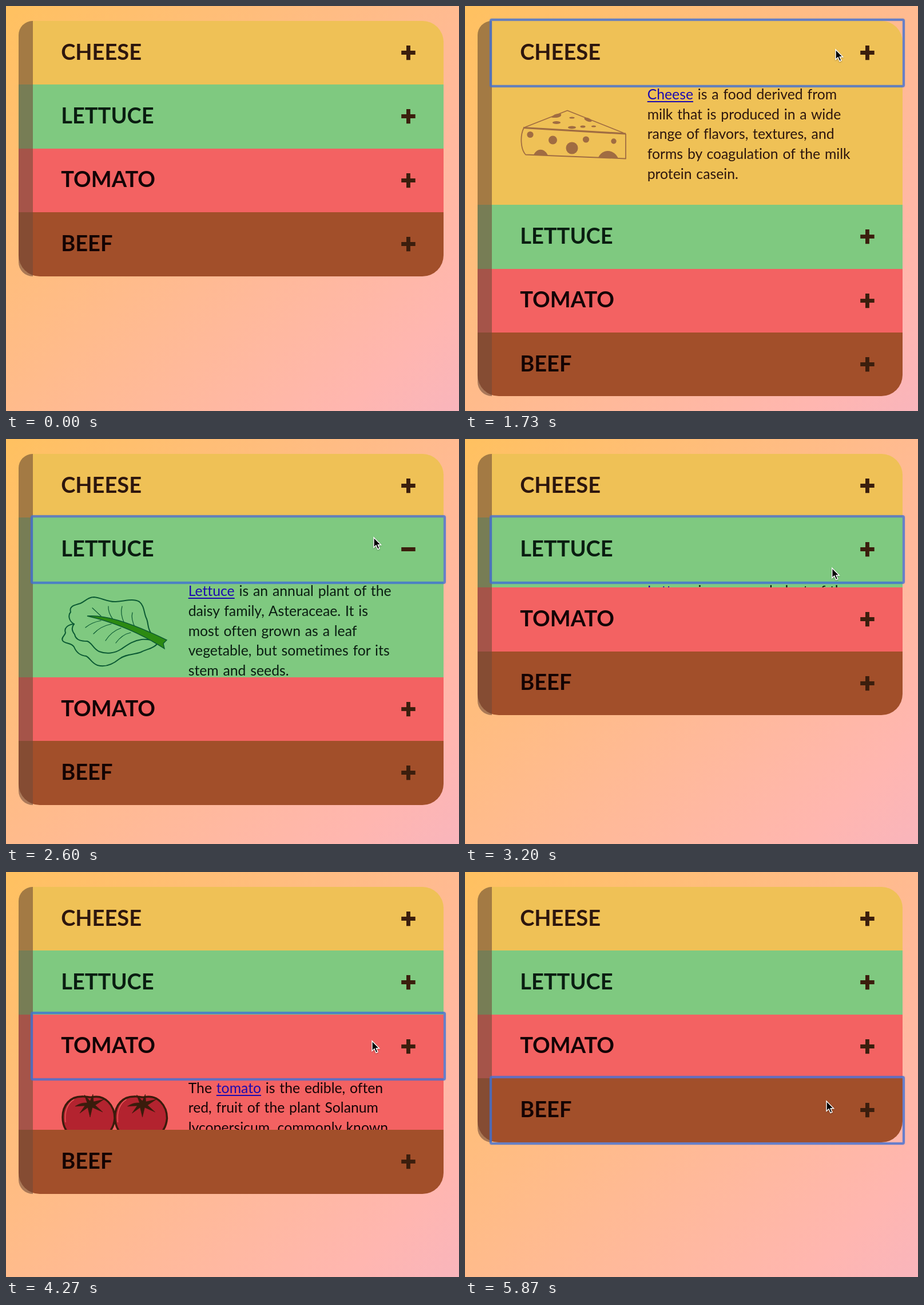
An HTML page for the animation above (5940 ms loop, 792 by 707 pixels).

```html
<!DOCTYPE html>
<html lang="en">
<head>
<meta charset="utf-8">
<title>Burger accordion</title>
<style>
  html, body { margin: 0; width: 100%; height: 100%; overflow: hidden; }
  body {
    position: relative;
    background: linear-gradient(135deg, #ffc160, #ffb6b0 87%, #f9b5bc);
    font-family: Lato, "Open Sans", sans-serif;
    font-variant-ligatures: none;
  }
  #card, #strip, #ring, #cursor, h2, p, .icon, .panel svg { position: absolute; margin: 0; }
  #card {
    left: 22.3px; top: 26px; width: 742.5px; overflow: hidden;
    border-radius: 24.75px 37px 37px 37px;
  }
  #strip {
    left: 22.3px; top: 26px; width: 24.75px;
    border-radius: 24.75px 0 0 24.75px;
    background: rgba(114, 75, 58, .6);
  }
  #ring {
    left: 43px; width: 718px; height: 112px;
    border: 4px solid rgba(66, 113, 212, .8); border-radius: 4px;
    box-shadow: 0 0 1.5px rgba(66, 113, 212, .6), inset 0 0 1.5px rgba(66, 113, 212, .6);
  }
  section { position: relative; }
  header { position: relative; height: 111.375px; }
  h2 {
    left: 73.9px; top: -2.4px;
    font-size: 38px; font-weight: 700; line-height: 111.375px;
  }
  .icon { left: 668.3px; top: 43px; width: 25px; height: 26px; fill: #3b1e0d; }
  .panel { position: relative; overflow: hidden; }
  .panel svg { left: -22.3px; overflow: visible; }
  p {
    left: 296.4px; top: -.5px; white-space: nowrap;
    font-size: 24.75px; line-height: 34.65px; word-spacing: 1.5px;
  }
  u { color: #1c0ab0; text-decoration-thickness: 1.6px; text-underline-offset: 2.5px; }
  #cursor { left: 0; top: 0; overflow: visible; filter: drop-shadow(0 1px 1px rgba(0, 0, 0, .3)); }
</style>
</head>
<body>
<div id="card"></div>
<div id="strip"></div>
<div id="ring"></div>
<svg id="cursor" width="14" height="22">
  <path d="M0 0V17.5L4 13.8 7 20.5 10 19.2 7.2 12.8H12.6Z" stroke="#fff" stroke-width="1.4"/>
</svg>
<script>
const STEP = 200 / 3, LOOP = 5940, HEAD = 111.375, TOP = 26, LINE = 34.65, FADE = 300;
const $ = id => document.getElementById(id);
const ellipse = (x, y, rx, ry = rx, turn = 0) =>
  `<ellipse cx="${x}" cy="${y}" rx="${rx}" ry="${ry}" transform="rotate(${turn} ${x} ${y})"/>`;

const cheeseArt = `
  <g fill="none" stroke="#a06c42" stroke-width="1.8" stroke-linejoin="round">
    <path d="M105 211.500L179 182.500 277 221.500"/>
    <path d="M103 212.500C96 226 97 250 106 259.500L281 266.500V223"/>
    <path d="M102 212.500L281 223" stroke-width="3.2"/>
  </g>
  <g fill="#a06c42">
    ${ellipse(114, 224.5, 5.6)}${ellipse(153.5, 234, 7.5)}${ellipse(187, 248, 10.5)}
    ${ellipse(211.5, 233, 5.6)}${ellipse(260, 236, 4.7)}
    ${ellipse(187, 195, 4.5, 1.5)}${ellipse(160, 203.5, 7, 2.5)}${ellipse(187, 212, 7, 2.6)}
    ${ellipse(206, 210.5, 4.5, 2)}${ellipse(225, 210, 4, 1.6)}${ellipse(215, 198.5, 7, 3, 22)}
    <path d="M151 194.500C155 189 161 187 168 188.500 170 195 158 196 151 194.500Z"/>
    <path d="M120 260C125 248 139 247 145 261Z"/>
    <path d="M233 264.500C240 249 260 249 268 266Z"/>
  </g>`;

const lettuceArt = `
  <g fill="none" stroke="#0b5a33" stroke-width="2" stroke-linecap="round">
    <path d="M119 323C110 318 108 308 113 302 110 291 121 290 130 287 139 283 143 276 154 276
      C167 277 178 285 192 284 208 283 222 278 233 284 242 291 241 303 245 312 250 322 246 330 255 341"/>
    <path d="M119 323C108 324 101 330 104 338 103 344 96 346 99 352 103 358 114 355 119 363
      C123 373 130 378 140 379 147 382 149 391 160 395 174 399 187 393 198 384 210 375 223 377 236 372
      C248 366 257 366 264 358L274 357"/>
    <path d="M119 323C113 330 116 336 120 341 122 352 133 353 142 353 151 356 152 366 163 371
      C176 376 190 374 201 367 213 359 222 352 237 350 250 349 260 353 271 352"/>
    <path d="M166 309L151 295M187 315Q178 302 179 292M207 322Q199 305 203 292M226 330Q218 314 221 303
      M166 317Q150 320 139 329M184 323Q165 327 153 340M201 330Q184 336 174 352M218 338Q203 341 192 356"
      stroke-width="1.2"/>
  </g>
  <path d="M142 309C176 306 226 324 281 351L275 357 277 366C240 342 198 322 142 309Z"
    fill="#2c8a12" stroke="#0b5a33" stroke-width="1.4"/>`;

const tomato = x => `
  <g transform="translate(${x})" stroke="#3a1c0c" stroke-linejoin="round">
    <path d="M99 428C99 406 113 392 132 392 139 391 144 394 150 393 174 388 190 408 190 430
      C188 456 167 470 145 470 121 470 99 456 99 428Z" fill="#b3232f" stroke-width="3.4"/>
    <path d="M104 437C102 417 108 404 119 397" fill="none" stroke="#f36262" stroke-width="1.2"/>
    <path d="M121 409Q131 402 142 403L137 389 147 400 152 388 153 401 171 397 156 407 169 419
      151 411 147 428 143 411 129 421 138 408Z" fill="#3a1c0c" stroke-width=".6"/>
  </g>`;

const beefArt = `
  <g stroke="#35150b" stroke-width="1.8">
    <path d="M98 553C98 532 130 509 170 510 213 510 211 538 241 544 261 547 283 546 281 560
      C278 583 264 592 235 598 192 605 150 608 125 603 101 594 97 570 98 553Z" fill="#70221a"/>
    <path d="M108 551C109 535 132 519 160 519 199 517 210 536 230 548 249 553 266 551 265 560
      C261 572 225 574 180 574 140 573 108 566 108 551Z" fill="#9d1227"/>
    <path d="M98 556C105 580 150 584 200 584 251 583 275 574 281 560" fill="none"/>
    <g fill="#fff">${ellipse(155.5, 539, 14, 6, 6)}</g>
  </g>`;

// open and close are click times in ms
const items = [
  { name: "CHEESE", color: "#efc156", ink: "#2d160e", open: 1200, close: 1733, art: cheeseArt, lines: [
    "<u>Cheese</u> is a food derived from", "milk that is produced in a wide",
    "range of flavors, textures, and", "forms by coagulation of the milk", "protein casein."] },
  { name: "LETTUCE", color: "#7fc980", ink: "#0a1d11", open: 2416, close: 2950, art: lettuceArt, lines: [
    "<u>Lettuce</u> is an annual plant of the", "daisy family, Asteraceae. It is",
    "most often grown as a leaf", "vegetable, but sometimes for its", "stem and seeds."] },
  { name: "TOMATO", color: "#f36262", ink: "#140406", open: 3640, close: 4168, art: tomato(0) + tomato(91.5), lines: [
    "The <u>tomato</u> is the edible, often", "red, fruit of the plant Solanum",
    "lycopersicum, commonly known", "as a tomato plant."] },
  { name: "BEEF", color: "#a24f2a", ink: "#140303", open: 4780, close: 5330, art: beefArt, lines: [
    "<u>Beef</u> is the culinary name for", "meat from cattle, particularly",
    "skeletal muscle. Beef is a source", "of high-quality protein and", "essential nutrients."] }
];

// time, x, y of the pointer
const path = [
  [460, 800, 330], [1100, 648, 76], [1750, 648, 76], [2350, 643, 172], [2950, 643, 172],
  [3500, 640, 295], [4270, 640, 295], [4720, 632, 400], [LOOP, 632, 400]
];

items.forEach((item, i) => {
  const section = document.createElement("section");
  section.style.cssText = `background:${item.color};color:${item.ink}`;
  section.innerHTML = `
    <header><h2>${item.name}</h2>
      <svg class="icon"><path d="M.2 9.100H24.700V15.900H.2Z"/><path class="bar" d="M9 0H15.900V25.200H9Z"/></svg>
    </header>
    <div class="panel">
      <svg width="792" height="707" style="top:${-TOP - HEAD * (i + 1)}px">${item.art}</svg>
      <p>${item.lines.join("<br>")}</p>
    </div>`;
  $("card").append(section);
  item.panel = section.querySelector(".panel");
  item.bar = section.querySelector(".bar");
  item.full = item.lines.length * LINE + 37.1;
});

const clamp = v => Math.min(1, Math.max(0, v));
const easeOut = v => 1 - (1 - clamp(v)) ** 1.67;
const smooth = v => v * v * (3 - 2 * v);

function pointer(t) {
  const n = Math.max(1, path.findIndex(k => k[0] >= t));
  const [a, b] = [path[n - 1], path[n]];
  const k = smooth(clamp((t - a[0]) / (b[0] - a[0])));
  return [a[1] + (b[1] - a[1]) * k, a[2] + (b[2] - a[2]) * k];
}

function draw(now) {
  const t = Math.floor((now % LOOP + 4) / STEP) * STEP;
  let height = HEAD * items.length, focus = -1;
  items.forEach((item, i) => {
    const { open, close, full } = item;
    const h = full * (easeOut((t - open) / FADE) - easeOut((t - close) / FADE));
    item.panel.style.height = h + "px";
    item.bar.style.display = t >= open && t < close ? "none" : "";
    height += h;
    if (t >= open) focus = i;
  });
  $("card").style.height = $("strip").style.height = height + "px";
  $("ring").style.display = focus < 0 ? "none" : "";
  $("ring").style.top = TOP + HEAD * focus - 4.4 + "px";

  const [x, y] = pointer(t);
  $("cursor").style.display = t < path[0][0] ? "none" : "";
  $("cursor").style.transform = `translate(${x}px, ${y}px)`;
}

function tick() {
  draw(performance.now());
  requestAnimationFrame(tick);
}
tick();
</script>
</body>
</html>
```
